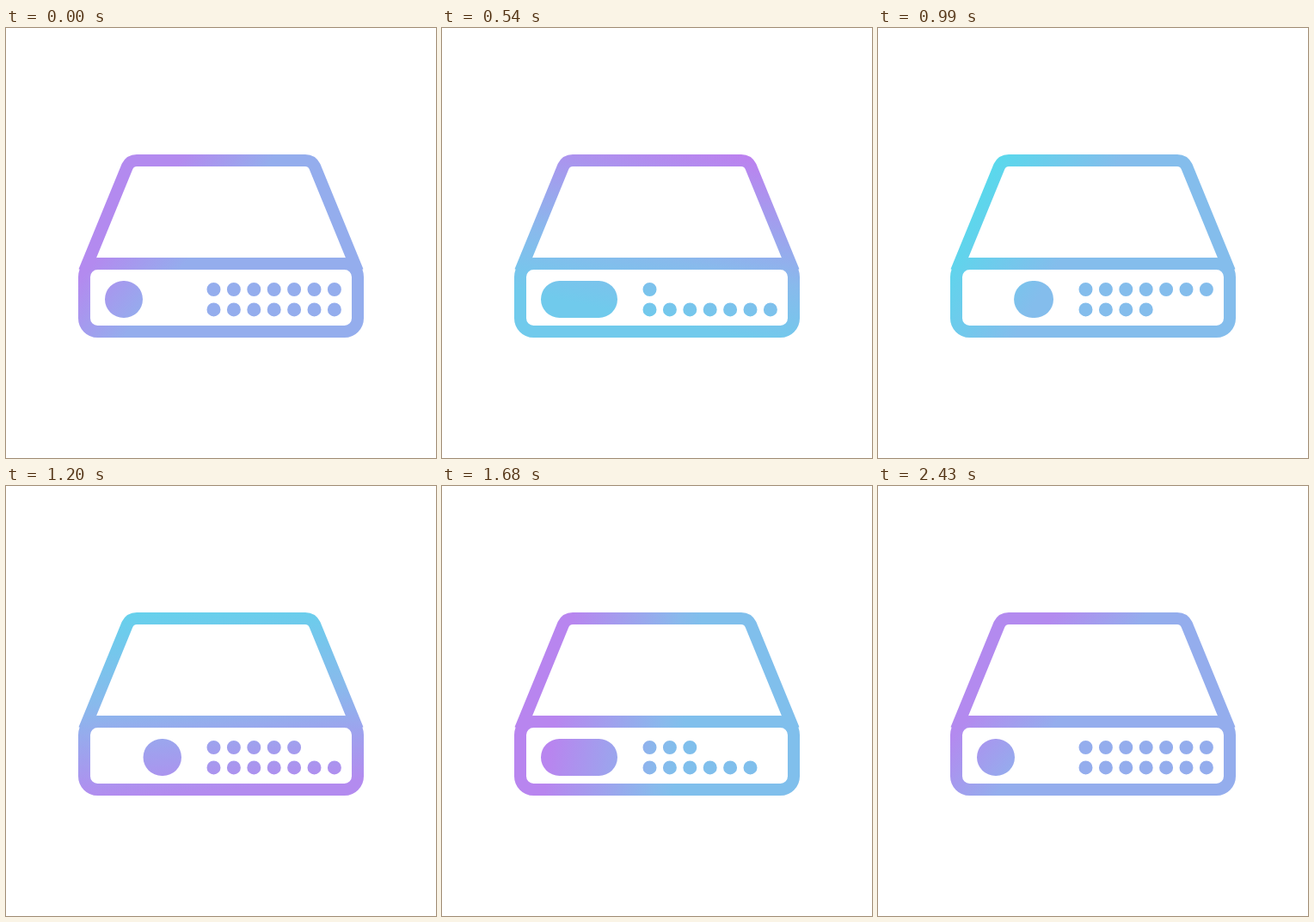
Write an HTML page with a canvas that moves like this. It is 500 px wide and 500 px high and loops after 2960 ms.

```html
<!DOCTYPE html>
<html lang="en">
<head>
<meta charset="utf-8">
<title>Server drive</title>
<style>
  html, body { margin: 0; height: 100%; overflow: hidden; background: #fff; }
  canvas { display: block; }
</style>
</head>
<body>
<canvas id="stage" width="500" height="500"></canvas>
<script>
const ctx = document.getElementById('stage').getContext('2d');
const LOOP = 2960, STEP = 30, MOVE_END = 2430, TURN = 2050;
const PURPLE = [196, 120, 240], BLUE = [136, 186, 236], CYAN = [82, 221, 236];

const clamp = (x, lo = 0, hi = 1) => Math.min(hi, Math.max(lo, x));
const wave = (t, period) => Math.sin(Math.PI * t / period) ** 2;

function ease(t, from, to) {
  const x = clamp((t - from) / (to - from));
  return x < 0.5 ? 4 * x ** 3 : 1 - 4 * (1 - x) ** 3;
}

function shade(f) {
  const [a, b, k] = f < 0.5 ? [PURPLE, BLUE, 2 * f] : [BLUE, CYAN, 2 * f - 1];
  return `rgb(${a.map((v, i) => Math.round(v + (b[i] - v) * k))})`;
}

// The gradient makes one full turn; only the part from low to high of its range shows.
function gradient(t) {
  const x = clamp(t / TURN);
  const angle = (40 + 360 * x * x * (3 - 2 * x)) * Math.PI / 180;
  const arc = wave(x, 1);
  const low = 0.14 * (1 - arc) + 0.54 * Math.exp(-(((t - 1000) / 170) ** 2));
  const high = 0.4 + 0.6 * arc;

  const c = Math.cos(angle), s = Math.sin(angle), from = -145, to = 170;
  const g = ctx.createLinearGradient(
    250 + c * from, 254 + s * from, 250 + c * to, 254 + s * to);
  for (const f of [low, clamp(0.5, low, high), high]) g.addColorStop(f, shade(f));
  return g;
}

const body = new Path2D('M91 283L141 161Q144.5 154 152 154L348 154Q355.5 154 359 161L409 283');
body.roundRect(91, 274, 318, 79, 15.5);

function lampRow(count, y) {
  for (let i = 0; i < Math.round(count); i++) {
    const x = 241.5 + 23.4 * i;
    ctx.moveTo(x + 8, y);
    ctx.arc(x, y, 8, 0, 2 * Math.PI);
  }
}

function draw(t) {
  ctx.clearRect(0, 0, 500, 500);
  ctx.fillStyle = ctx.strokeStyle = gradient(t);
  ctx.lineWidth = 14;
  ctx.stroke(body);

  const left = 115 + 45 * (ease(t, 600, 1100) - ease(t, 1140, 1580));
  const right = 159 + 45 * (ease(t, 0, 500) - ease(t, 1740, 2300));
  ctx.beginPath();
  ctx.roundRect(left, 294, right - left, 43, 21.5);
  lampRow(7 - 6 * wave(Math.min(t, 2000), 1000), 304);
  lampRow(7 - 4.1 * (1 - t / 3600) * wave(t, 610), 327.4);
  ctx.fill();
}

function tick() {
  const t = performance.now() % LOOP;
  draw(Math.min(MOVE_END, Math.floor(t / STEP) * STEP));
  requestAnimationFrame(tick);
}
tick();
</script>
</body>
</html>
```
